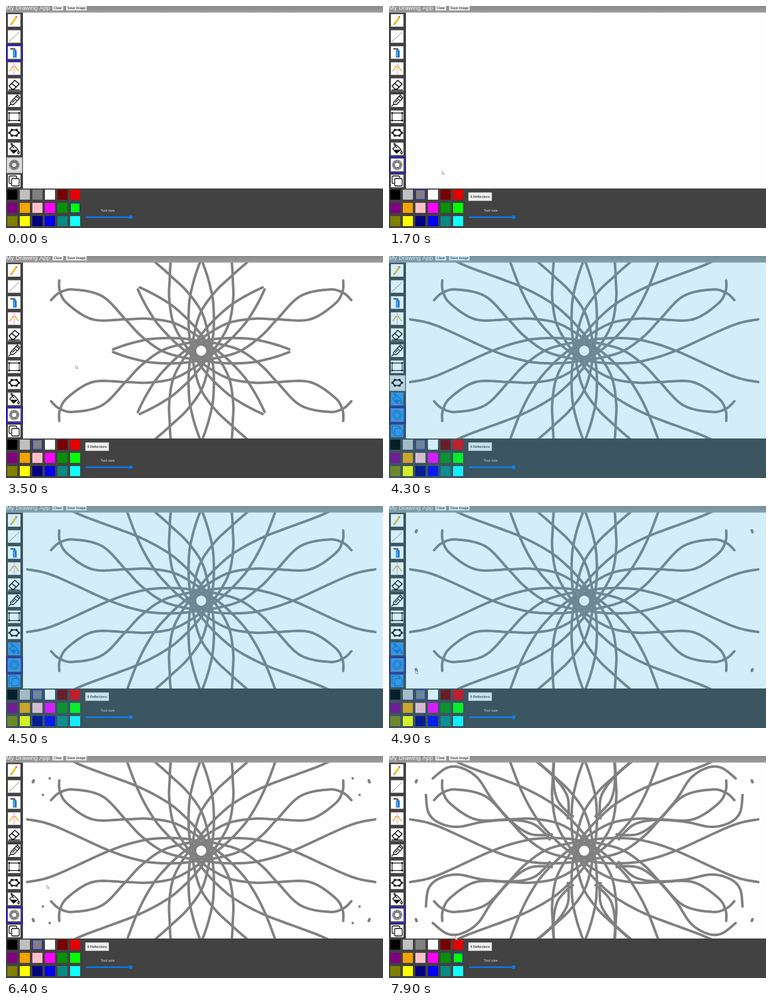
An HTML page with a canvas that plays this animation: 600x354 px, repeating every 8 s.

```html
<!DOCTYPE html>
<html lang="en">
<head>
<meta charset="utf-8">
<title>Drawing app</title>
<style>
  html, body { margin: 0; width: 100%; height: 100%; overflow: hidden; background: #424242; }
  canvas { display: block; width: 600px; height: 354px; }
</style>
</head>
<body>
<canvas id="stage"></canvas>
<script>
const LOOP = 8000;
const stage = document.getElementById('stage');
const ctx = stage.getContext('2d');
const ratio = window.devicePixelRatio || 1;
stage.width = 600 * ratio;
stage.height = 354 * ratio;

const CENTER = { x: 310.7, y: 151 };
const FONT = '"Liberation Sans", Arial, sans-serif';
const BLUE = '#2418b8';
const SPRAY = 2, POLYGON = 7, BUCKET = 8, MIRROR = 9;
const SWATCHES = [
  '#000', '#c0c0c0', '#808080', '#fff', '#780000', '#e60000',
  '#800080', '#f5a300', '#ffc0cb', '#f0f', '#089008', '#0f0',
  '#808000', '#ff0', '#000080', '#0000f0', '#0a8a80', '#14ffff'
];
const GRAY = 2, LIME = 11;

const mix = (a, b, p) => a + (b - a) * p;
const clamp = p => Math.min(1, Math.max(0, p));
const between = (t, from, to) => t >= from && t < to;

// Catmull-Rom curve through the key points, as a fine polyline.
function spline(points, steps = 12) {
  const at = i => points[Math.min(points.length - 1, Math.max(0, i))];
  const out = [];
  for (let i = 0; i < points.length - 1; i++) {
    const [a, b, c, d] = [at(i - 1), at(i), at(i + 1), at(i + 2)];
    for (let s = 0; s < steps; s++) {
      const u = s / steps;
      out.push([0, 1].map(k => b[k] + u / 2 * (c[k] - a[k] +
        u * (2 * a[k] - 5 * b[k] + 4 * c[k] - d[k] +
        u * (3 * b[k] - a[k] - 3 * c[k] + d[k])))));
    }
  }
  return [...out, at(points.length)];
}

// Key points are offsets from the centre.
function makeStroke(from, to, keys) {
  const points = spline(keys);
  const lengths = [0];
  for (let i = 1; i < points.length; i++) {
    const [a, b] = [points[i - 1], points[i]];
    lengths.push(lengths[i - 1] + Math.hypot(b[0] - a[0], b[1] - a[1]));
  }
  return { from, to, points, lengths };
}

function drawnPart({ from, to, points, lengths }, t) {
  const reach = clamp((t - from) / (to - from)) * lengths[lengths.length - 1];
  return points.filter((p, i) => lengths[i] <= reach);
}

const strokes = [
  makeStroke(2620, 3780, [
    [-226, 112], [-225, 95], [-213, 75], [-173, 50], [-120, 50], [-85, 51], [-46, 45],
    [-16, 30], [6, 13], [10, -2], [-2, -14], [-25, -19], [-60, -20], [-95, -16],
    [-146, 0], [-235, 40], [-277, 50]
  ]),
  makeStroke(4700, 4800, [[-268, 109.5], [-266.5, 112]]),
  makeStroke(6400, 7250, [
    [-252, 89], [-248, 61], [-232, 45], [-202, 38], [-161, 46], [-115, 49],
    [-82, 43], [-62, 27], [-55, 18]
  ])
];

// Pointer moves between strokes: start, end, x, y.
const moves = [
  [0, 0, 13, 253], [200, 1000, 50, 300], [1100, 1600, 85, 264], [3600, 3660, 34, 201],
  [3780, 3980, 13, 201], [4400, 4750, 43, 263], [4950, 5450, 58, 241],
  [7000, 7130, 256, 169], [7150, 7550, 110, 321], [7700, 7900, 106, 289]
];

function pointerAt(t) {
  const ahead = t + 120;
  const live = strokes.find(s => s.to - s.from > 500 && between(ahead, s.from, s.to));
  if (live) {
    const [x, y] = drawnPart(live, ahead).pop();
    return [CENTER.x + x, CENTER.y + y];
  }
  let spot = [0, 0];
  for (const [from, to, x, y] of moves) {
    if (t < from) break;
    const p = to > from ? clamp((t - from) / (to - from)) : 1;
    const eased = p * p * (3 - 2 * p);
    spot = [mix(spot[0], x, eased), mix(spot[1], y, eased)];
  }
  return spot;
}

function box(x, y, w, h, fill, border, width = 1) {
  ctx.fillStyle = fill;
  ctx.fillRect(x, y, w, h);
  if (border) {
    ctx.strokeStyle = border;
    ctx.lineWidth = width;
    ctx.strokeRect(x + width / 2, y + width / 2, w - width, h - width);
  }
}

function text(str, x, y, size, color) {
  ctx.font = `${size}px ${FONT}`;
  ctx.fillStyle = color;
  ctx.fillText(str, x, y);
}

function button(str, x, y, w, h) {
  box(x, y, w, h, '#efefef', '#777', .5);
  ctx.textAlign = 'center';
  text(str, x + w / 2, y + h / 2 + 1.9, 5.4, '#111');
  ctx.textAlign = 'left';
}

function line(path, color = '#111', width = 1.3) {
  ctx.strokeStyle = color;
  ctx.lineWidth = width;
  ctx.stroke(new Path2D(path));
}

function area(path, color = '#111') {
  ctx.fillStyle = color;
  ctx.fill(new Path2D(path));
}

function disc(x, y, r, color = '#111') {
  ctx.beginPath();
  ctx.arc(x, y, r, 0, Math.PI * 2);
  ctx.fillStyle = color;
  ctx.fill();
}

function ring(r, width, dash = []) {
  ctx.beginPath();
  ctx.arc(10, 10, r, 0, Math.PI * 2);
  ctx.setLineDash(dash);
  ctx.strokeStyle = '#222';
  ctx.lineWidth = width;
  ctx.stroke();
  ctx.setLineDash([]);
}

function pencil(x = 0, y = 0, sx = 1, sy = 1) {
  ctx.save();
  ctx.translate(x, y);
  ctx.scale(sx, sy);
  line('M6 15L13 5', '#f2cf1c', 3);
  line('M7 15.5L14 5.5', '#d79a14', .7);
  line('M13 5L14 3.6', '#e0453c', 3);
  area('M4 18L4.8 14L7.2 15.8Z', '#b9803f');
  ctx.restore();
}

// Each icon is drawn in a 20 by 20 box.
const icons = [
  () => pencil(),
  () => line('M2 18L18 3', '#555', .7),
  () => {
    area('M8 7Q11 4 14 7V18H8Z', '#1f78c8');
    area('M9 8H11V17H9Z', '#67b4ec');
    line('M4 4L12 4.5', '#26384a', 2);
  },
  () => {
    pencil(0, 4, .6, .6);
    pencil(20, 4, -.6, .6);
    line('M10 1V19', '#f06a9a', .8);
  },
  () => line('M2 12L11 3L18 9L10 17H6ZM6 8L13.5 14M1 18.5H19', '#111', 1.5),
  () => line('M4 13L13 3L18 7L9 16L5 16ZM10 6L15 10.5M7 13L11 9M1 19L5 15M13 3L15 1L19 5L18 7'),
  () => {
    line('M2 4H18V16H2Z', '#111', 1.1);
    for (const x of [2, 18]) for (const y of [4, 16]) disc(x, y, 1.6);
  },
  () => {
    line('M2.5 10L6.2 5.5H13.8L17.5 10L13.8 14.5H6.2Z', '#111', 1.7);
    for (let a = 0; a < 6; a++) {
      disc(10 + 7.5 * Math.cos(a * Math.PI / 3), 10 + 5.2 * Math.sin(a * Math.PI / 3), 1.9);
    }
  },
  () => {
    line('M3 10L9 4L16 11L9 17ZM10 9L5 3Q4 0 7 2V7M17 13Q14.4 17 17 18Q19.6 17 17 13Z');
    area('M4 11.5H15L9 17Z');
  },
  () => {
    ring(4.2, 1);
    ring(5.9, 1.8, [.9, .5]);
    ring(7.7, 1.4, [.8, .9]);
  },
  () => {
    line('M5 14H3.5Q2 14 2 12V4Q2 2 4 2H12Q14 2 14 4V5');
    line('M8 6H16Q18 6 18 8V16Q18 18 16 18H8Q6 18 6 16V8Q6 6 8 6Z');
  }
];

function drawTools(t, selecting) {
  const active = t < 200 ? SPRAY : MIRROR;
  const hover = t < 200 ? MIRROR : between(t, 3980, 4450) ? POLYGON : -1;
  box(0, 10.5, 27, 281, '#424242');
  icons.forEach((icon, i) => {
    const y = 23 + i * 25.6;
    if (i === active) box(0, y - 13, 27, 27, '#555', BLUE, 2);
    if (i === hover) box(1, y - 12, 25, 25, '#d2d2d2');
    box(3, y - 10, 20, 20, i === hover ? '#e2e2e2' : '#fff');
    ctx.save();
    ctx.translate(3, y - 10);
    icon();
    if (selecting && i >= BUCKET) box(0, 0, 20, 20, 'rgba(22, 128, 226, .85)');
    ctx.restore();
  });
}

function drawHeader() {
  const shade = ctx.createLinearGradient(0, 0, 0, 10.5);
  shade.addColorStop(0, '#8b8b8b');
  shade.addColorStop(1, '#9c9c9c');
  box(0, 0, 600, 10.5, shade);
  text('My Drawing App', 0, 6, 9.55, '#fff');
  button('Clear', 73.5, -1, 18, 8.5);
  button('Save Image', 95, -1, 34, 8.5);
}

function drawPanel(t) {
  box(0, 291, 600, 63, '#424242');
  const chosen = between(t, 1000, 7600) ? GRAY : LIME;
  SWATCHES.forEach((color, i) => {
    const x = 2 + i % 6 * 20, y = 292.8 + Math.floor(i / 6) * 21.1;
    box(x, y, 16, 16, color, i === chosen && '#2420d0');
  });
  if (t >= 200) button('6 Reflections', 126, 297, 38, 14);
  text('Tool size', 150.5, 328, 5.8, '#ddd');
  ctx.lineCap = 'round';
  line('M128 336.7H198', '#0a78f0', 2.4);
  ctx.lineCap = 'butt';
  disc(198.3, 336.7, 3, '#0a78f0');
}

// Eight turns, each also mirrored.
function drawStrokes(t) {
  ctx.save();
  ctx.translate(CENTER.x, CENTER.y);
  ctx.lineCap = ctx.lineJoin = 'round';
  ctx.strokeStyle = '#808080';
  ctx.lineWidth = 4;
  for (const stroke of strokes.filter(s => t >= s.from)) {
    const path = new Path2D();
    const part = drawnPart(stroke, t);
    [part[0], ...part].forEach(p => path.lineTo(...p));
    for (let k = 0; k < 16; k++) {
      ctx.save();
      ctx.rotate((k >> 1) * Math.PI / 4);
      if (k % 2) ctx.scale(1, -1);
      ctx.stroke(path);
      ctx.restore();
    }
  }
  ctx.restore();
}

function drawPointer(t) {
  const [x, y] = pointerAt(t);
  if (x < 28 || y > 291) return;
  ctx.save();
  ctx.translate(x - .5, y - 1);
  const arrow = 'M0 0V5.2L1.3 4.1L2.2 6L3.1 5.6L2.3 3.8H3.9Z';
  area(arrow, '#fff');
  line(arrow, '#777', .6);
  ctx.restore();
}

function tintAt(t) {
  if (between(t, 3950, 5350)) return .19;
  return between(t, 5350, 6200) ? .06 * (6200 - t) / 850 : 0;
}

function draw(t) {
  const tint = tintAt(t);
  ctx.setTransform(ratio, 0, 0, ratio, 0, 0);
  box(0, 0, 600, 354, '#fefefe');
  drawStrokes(t);
  drawHeader();
  drawPanel(t);
  drawTools(t, tint > .1);
  if (tint) box(0, 0, 600, 354, `rgba(30, 162, 228, ${tint})`);
  drawPointer(t);
}

const start = performance.now();
function tick() {
  draw((performance.now() - start) % LOOP);
  requestAnimationFrame(tick);
}
tick();
</script>
</body>
</html>
```
